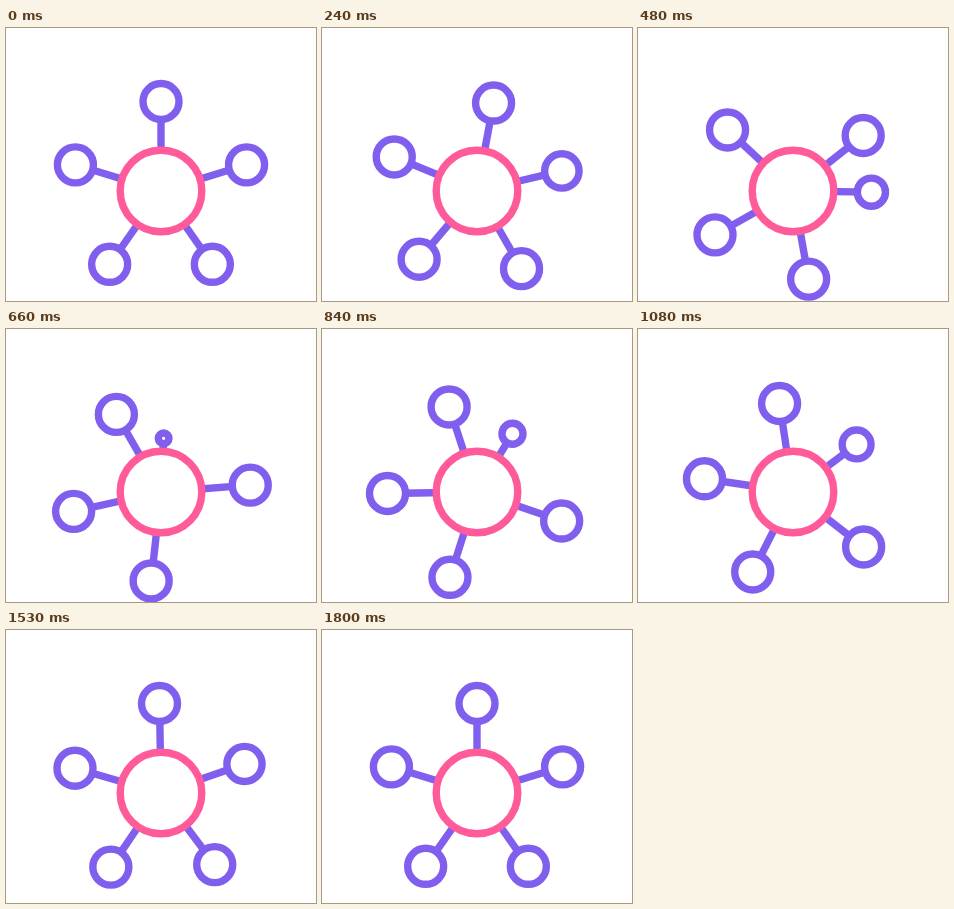
Write an HTML page that moves like this. It is 310 px wide and 273 px high and loops after 1830 ms.

```html
<!DOCTYPE html>
<html lang="en">
<head>
<meta charset="utf-8">
<title>Orbiting nodes</title>
<style>
  html, body { margin: 0; width: 100%; height: 100%; overflow: hidden; background: #fff; }
  svg { display: block; width: 100vw; height: 100vh; }
</style>
</head>
<body>
<svg viewBox="0 0 310 273" fill="#fff" stroke-width="7.4">
  <g id="nodes" stroke="#815fee"></g>
  <circle cx="155" cy="163" r="40.8" stroke="#ff5a99"/>
</svg>
<script>
const LOOP = 1830, MOVE = 1800;
const CENTER = { x: 155, y: 163 }, ORBIT = 89.5, NODE_R = 18;
const DIVE_DEPTH = 51;

// Clockwise degrees from the top; the diving node returns to its own slot.
const orbiters = [[0, 145], [145, 215], [215, 287], [287, 360]];
const DIVE_SLOT = 73;
// Progress against how far the diving node has sunk into the core.
const diveKeys = [[0, 0], [.36, .22], [.5, 1], [.6, .67], [1, 0]];

const lerp = (a, b, k) => a + (b - a) * k;

function cubic(a, b, s) {
  const r = 1 - s;
  return 3 * s * r * r * a + 3 * s * s * r * b + s * s * s;
}

function ease(x) {
  let lo = 0, hi = 1;
  for (let i = 0; i < 30; i++) {
    const mid = (lo + hi) / 2;
    if (cubic(1 / 3, .2, mid) < x) lo = mid; else hi = mid;
  }
  return cubic(0, 1, (lo + hi) / 2);
}

function sample(keys, p) {
  const i = Math.max(1, keys.findIndex(k => k[0] >= p));
  const [p0, v0] = keys[i - 1], [p1, v1] = keys[i];
  return lerp(v0, v1, (p - p0) / (p1 - p0));
}

function make(tag, parent) {
  const el = document.createElementNS("http://www.w3.org/2000/svg", tag);
  return parent.appendChild(el);
}

function set(el, attrs) {
  for (const name in attrs) el.setAttribute(name, attrs[name]);
}

function createNode() {
  const group = make("g", document.getElementById("nodes"));
  const line = make("line", group), ring = make("circle", group);
  set(line, { x1: CENTER.x, y1: CENTER.y });
  return (degrees, distance, radius) => {
    const a = degrees * Math.PI / 180;
    const x = CENTER.x + distance * Math.sin(a);
    const y = CENTER.y - distance * Math.cos(a);
    set(line, { x2: x, y2: y });
    set(ring, { cx: x, cy: y, r: radius });
  };
}

const placeDiver = createNode();
const placeOrbiters = orbiters.map(createNode);

function render(ms) {
  const p = ease(Math.min(1, ms / MOVE));
  orbiters.forEach(([from, to], i) => placeOrbiters[i](lerp(from, to, p), ORBIT, NODE_R));

  const sunk = Math.min(1, Math.max(0, sample(diveKeys, Math.min(p, 1))));
  const swing = p < .5 ? 82 : -100;
  placeDiver(DIVE_SLOT + swing * sunk, ORBIT - DIVE_DEPTH * sunk, NODE_R * (1 - sunk));
}

const start = performance.now();
function tick() {
  render((performance.now() - start) % LOOP);
  requestAnimationFrame(tick);
}
tick();
</script>
</body>
</html>
```
